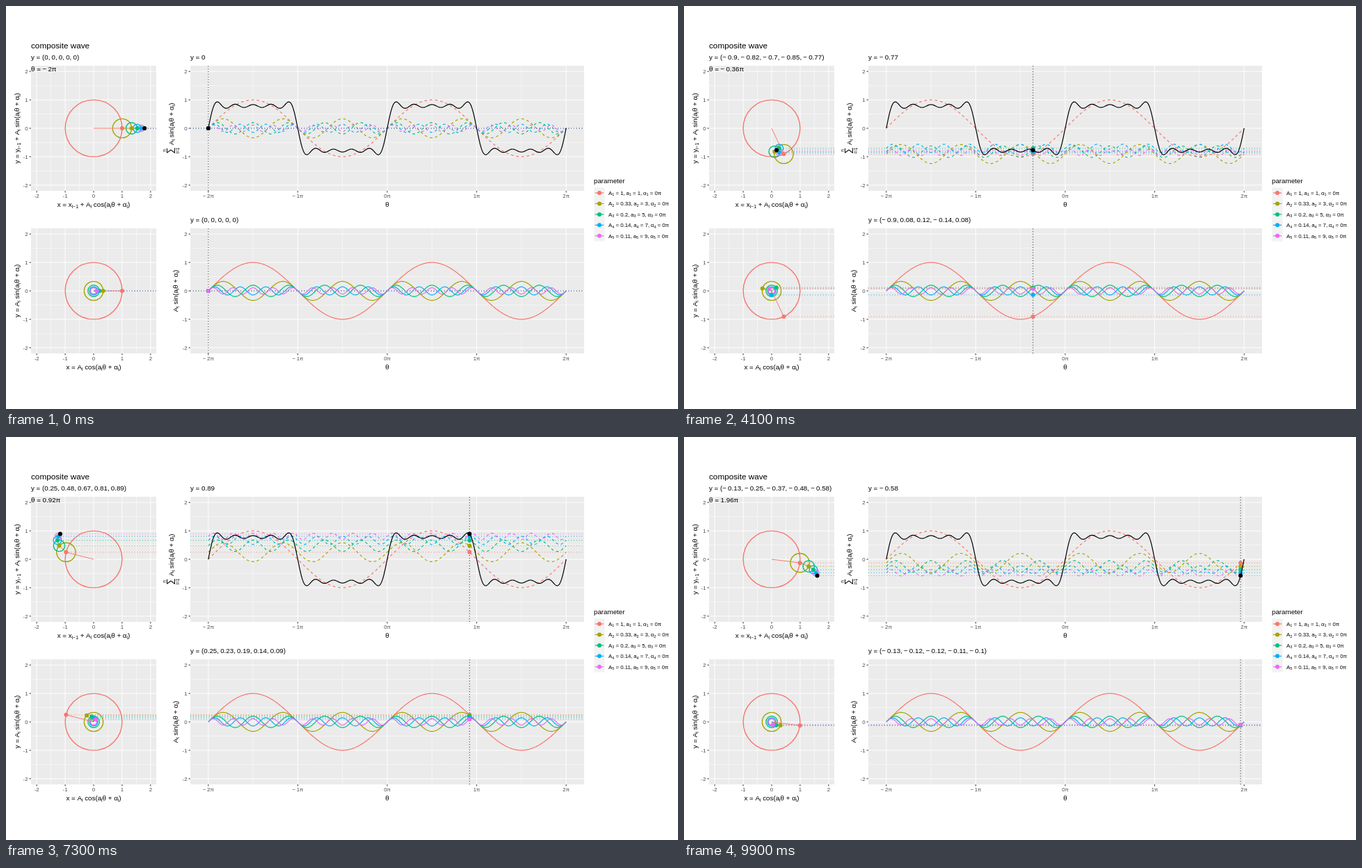
Write an HTML page with a canvas that moves like this. It is 966 px wide and 580 px high and loops after 10000 ms.

```html
<!DOCTYPE html>
<html lang="en">
<head>
<meta charset="utf-8">
<title>Composite wave</title>
<style>
html, body { margin: 0; width: 100%; height: 100%; overflow: hidden; background: #fff; }
canvas { display: block; }
</style>
</head>
<body>
<canvas id="stage" width="966" height="580"></canvas>
<script>
const ctx = document.getElementById('stage').getContext('2d');
const PI = Math.PI;
const STEPS = 100, STEP_MS = 100;
const BASE = 9.78, SMALL = 7.82, LINE = 0.95, CURVE = 1.2, DOT = 3;
const DOTTED = [LINE, 3 * LINE], DASHED = [4 * LINE, 4 * LINE];
const UNIT = 180 / 4.4, PI_W = 128.6;
const colors = ['#F8766D', '#A3A500', '#00BF7D', '#00B0F6', '#E76BF3'];
const waves = colors.map((color, i) => ({ color, freq: 2 * i + 1, amp: 1 / (2 * i + 1) }));

const panel = (x, y, w, zeroX, unitX) => ({
  x, y, w, h: 180,
  px: v => zeroX + v * unitX,
  py: v => y + 90 - v * UNIT
});
const circleTop = panel(36, 86, 180, 126, UNIT);
const circleLow = panel(36, 320, 180, 126, UNIT);
const waveTop = panel(265, 86, 566, 548, PI_W);
const waveLow = panel(265, 320, 566, 548, PI_W);

// Rich text: _x or _{xyz} is a subscript, ~ is a thin gap.
function layout(str, size) {
  const parts = [];
  let x = 0;
  for (const m of str.matchAll(/_\{(.*?)\}|_(.)|~|[^_~]+/g)) {
    if (m[0] === '~') { x += size * 0.22; continue; }
    const sub = m[1] || m[2];
    const font = `${sub ? size * 0.7 : size}px "Liberation Sans", Arial, sans-serif`;
    const text = sub || m[0];
    ctx.font = font;
    parts.push({ text, font, x, dy: sub ? size * 0.22 : 0 });
    x += ctx.measureText(text).width;
  }
  return { parts, width: x };
}

function label(str, x, y, { size = BASE, align = 0, color = '#000', turn = false } = {}) {
  const { parts, width } = layout(str, size);
  ctx.save();
  ctx.translate(x, y);
  if (turn) ctx.rotate(-PI / 2);
  ctx.fillStyle = color;
  for (const p of parts) {
    ctx.font = p.font;
    ctx.fillText(p.text, p.x - width * align, p.dy);
  }
  ctx.restore();
}

function stroke(color, width = LINE, dash = []) {
  ctx.strokeStyle = color;
  ctx.lineWidth = width;
  ctx.setLineDash(dash);
  ctx.stroke();
}

function line(x1, y1, x2, y2, color, width, dash) {
  ctx.beginPath();
  ctx.moveTo(x1, y1);
  ctx.lineTo(x2, y2);
  stroke(color, width, dash);
}

function dot(x, y, color) {
  ctx.beginPath();
  ctx.arc(x, y, DOT, 0, 2 * PI);
  ctx.fillStyle = color;
  ctx.fill();
}

function curve(p, fn, color, dash) {
  const n = 900;
  ctx.beginPath();
  for (let i = 0; i <= n; i++) {
    const v = -2 + 4 * i / n;
    ctx.lineTo(p.px(v), p.py(fn(v * PI)));
  }
  stroke(color, CURVE, dash);
}

const signed = v => (v < 0 ? '−~' : '') + Math.abs(v);
const round2 = v => Math.round(v * 100) / 100;
const num = v => signed(round2(v));
const list = vals => `y = (${vals.map(num).join(',~')})`;
const waveAt = (w, th) => w.amp * Math.sin(w.freq * th);
const total = th => waves.reduce((s, w) => s + waveAt(w, th), 0);

function drawPanel(p, tickLabel) {
  const right = p.x + p.w, bottom = p.y + p.h;
  const tick = { size: SMALL, color: '#4D4D4D' };
  ctx.fillStyle = '#EBEBEB';
  ctx.fillRect(p.x, p.y, p.w, p.h);
  for (let v = -1.5; v < 2; v++) {
    line(p.px(v), p.y, p.px(v), bottom, '#fff', 0.5);
    line(p.x, p.py(v), right, p.py(v), '#fff', 0.5);
  }
  for (let v = -2; v <= 2; v++) {
    const x = p.px(v), y = p.py(v);
    line(x, p.y, x, bottom, '#fff');
    line(p.x, y, right, y, '#fff');
    line(x, bottom, x, bottom + 2.5, '#333');
    line(p.x - 2.5, y, p.x, y, '#333');
    label(tickLabel(v), x, bottom + 10, { ...tick, align: 0.5 });
    label(String(v), p.x - 4.5, y + 2.8, { ...tick, align: 1 });
  }
}

function drawAxes() {
  const mid = { align: 0.5 }, side = { align: 0.5, turn: true };
  const sine = 'A_i sin(a_iθ + α_i)', cosine = 'A_i cos(a_iθ + α_i)';
  for (const p of [circleTop, circleLow]) drawPanel(p, String);
  for (const p of [waveTop, waveLow]) drawPanel(p, v => signed(v) + 'π');
  label('composite wave', 36, 61.3, { size: 11.73 });
  label('x = x_{i−1} + ' + cosine, 126, 288.7, mid);
  label('x = ' + cosine, 126, 522.7, mid);
  label('θ', 548, 288.7, mid);
  label('θ', 548, 522.7, mid);
  label('y = y_{i−1} + ' + sine, 19, 176, side);
  label('y = ' + sine, 19, 410, side);
  label(sine, 247.3, 410, side);
  label(sine, 240.5, 200, { turn: true });
  label('∑', 240, 208, { ...side, size: 13 });
  label('n', 229.5, 208, { ...side, size: 6.5 });
  label('i=1', 248.5, 208, { ...side, size: 6.5 });
}

function drawLegend() {
  label('parameter', 845, 255.2);
  waves.forEach((w, i) => {
    const y = 269 + i * 15.45, n = i + 1;
    ctx.fillStyle = '#F2F2F2';
    ctx.fillRect(845.3, y - 7.7, 15.4, 15.5);
    line(846.8, y, 859.2, y, w.color, CURVE);
    dot(853, y, w.color);
    label(`A_${n} = ${round2(w.amp)},~a_${n} = ${w.freq},~α_${n} = 0π`, 866, y + 2.7, { size: SMALL });
  });
}

// Arms either hang off one another (top) or all start at the centre (bottom).
function drawCircles(p, arms) {
  const edge = p.x + p.w;
  for (const a of arms) {
    ctx.beginPath();
    ctx.arc(p.px(a.x0), p.py(a.y0), a.amp * UNIT, 0, 2 * PI);
    stroke(a.color, 1.4);
  }
  for (const a of arms) line(p.px(a.x0), p.py(a.y0), p.px(a.x), p.py(a.y), a.color);
  // Measured from the panel edge so that the dots of all levels line up.
  for (const a of arms) line(edge, p.py(a.y), p.px(a.x), p.py(a.y), a.color, LINE, DOTTED);
  for (const a of arms) dot(p.px(a.x), p.py(a.y), a.color);
}

function drawWaves(p, arms, turns, dash) {
  const x = p.px(turns);
  for (const a of arms) curve(p, th => a.y0 + waveAt(a, th), a.color, dash);
  for (const a of arms) line(p.x, p.py(a.y), p.x + p.w, p.py(a.y), a.color, LINE, DOTTED);
  line(x, p.y + p.h, x, p.y, '#000', LINE, DOTTED);
  for (const a of arms) dot(x, p.py(a.y), a.color);
}

function draw(step) {
  const turns = round2(-2 + step * 4 / STEPS), th = turns * PI;
  let x = 0, y = 0;
  const chained = [], centred = [];
  for (const w of waves) {
    const dx = w.amp * Math.cos(w.freq * th), dy = waveAt(w, th);
    centred.push({ ...w, x0: 0, y0: 0, x: dx, y: dy });
    chained.push({ ...w, x0: x, y0: y, x: x += dx, y: y += dy });
  }

  ctx.fillStyle = '#fff';
  ctx.fillRect(0, 0, 966, 580);
  drawAxes();
  drawLegend();

  drawCircles(circleTop, chained);
  dot(circleTop.px(x), circleTop.py(y), '#000');
  drawCircles(circleLow, centred);

  drawWaves(waveTop, chained, turns, DASHED);
  curve(waveTop, total, '#000');
  dot(waveTop.px(turns), waveTop.py(y), '#000');
  drawWaves(waveLow, centred, turns);

  label(list(chained.map(a => a.y)), 36, 76.8);
  label(`θ = ${signed(turns)}π`, 36, 93.5);
  label('y = ' + num(y), 265, 76.8);
  label(list(centred.map(a => a.y)), 265, 311.3);
}

function tick() {
  draw(Math.floor(performance.now() / STEP_MS) % STEPS);
  requestAnimationFrame(tick);
}
tick();
</script>
</body>
</html>
```
